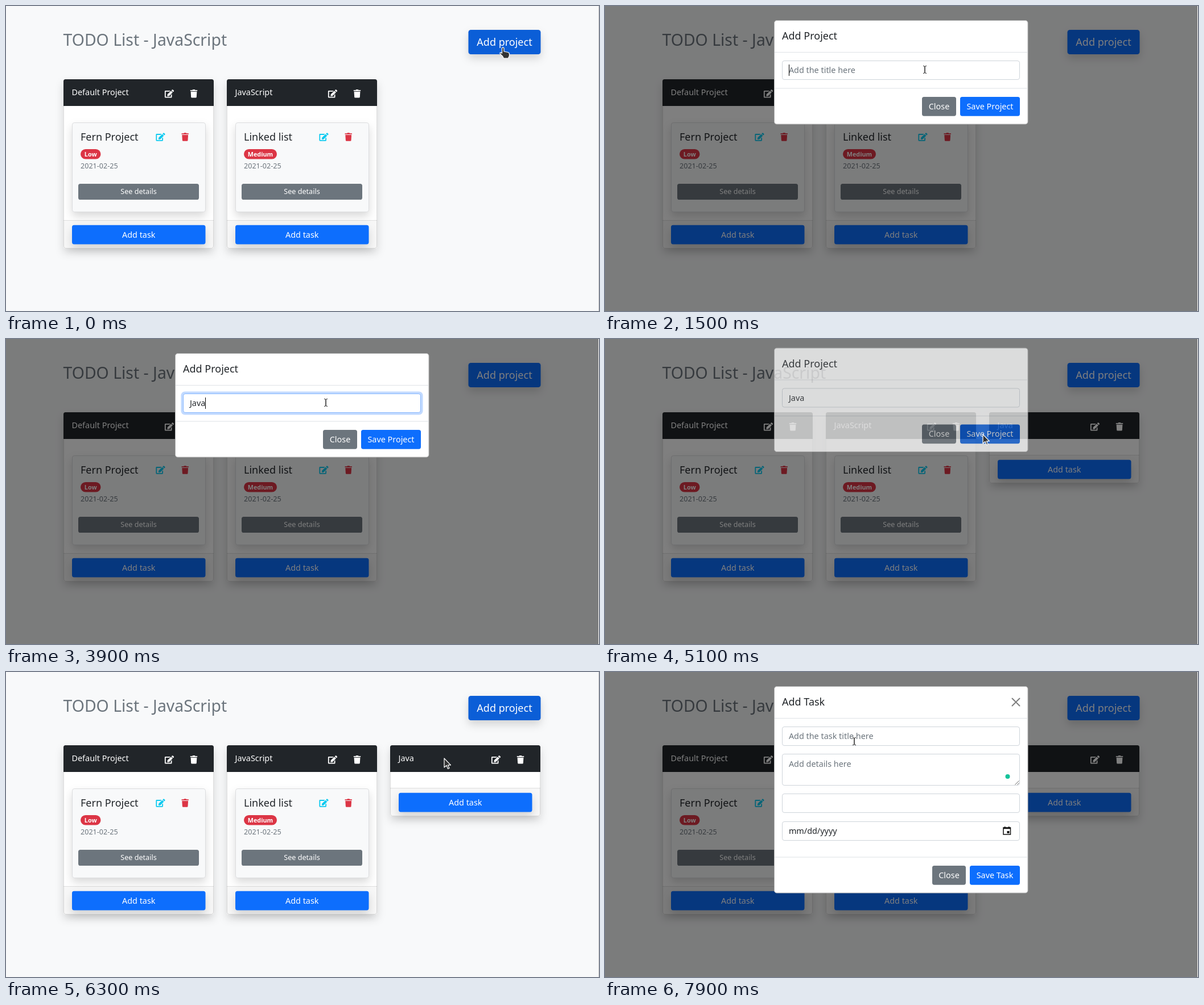
Recreate the animation shown at these times as an HTML page. Size 1042 by 537 pixels, loop 8000 ms.

```html
<!DOCTYPE html>
<html lang="en">
<head>
<meta charset="utf-8">
<title>Todo list</title>
<style>
  html, body { margin: 0; width: 100%; height: 100%; overflow: hidden; background: #f8f9fa; }
  svg { display: block; width: 1042px; height: 537px; }
  text { font-family: 'Noto Sans', 'Open Sans', sans-serif; font-size: 14.4px; white-space: pre; }
</style>
</head>
<body>
<svg id="stage" viewBox="0 0 1042 537"></svg>
<script>
const LOOP = 8000, STEP = 100;
const INK = '#212529', GRAY = '#6c757d', BLUE = '#0d6efd', RED = '#dc3545';
const EDIT = 'M403 83l90 90a10 10 0 0 1 0 14L274 406l-93 10a20 20 0 0 1-21-21l10-93L389 83a10 10 0 0 1 14 0z' +
  'M565 60a39 39 0 0 1 0 55l-35 36a10 10 0 0 1-14 0L425 61a10 10 0 0 1 0-14l36-35a39 39 0 0 1 55 0z' +
  'M384 346V448H64V128H294q5 0 8-3l40-40q10-16-8-21H48a48 48 0 0 0-48 48v352a48 48 0 0 0 48 48h352a48 48 0 0 0 48-48V306q-5-18-21-8l-40 40q-3 3-3 8z';
const TRASH = 'M432 32H312L303 13A24 24 0 0 0 281 0H167A24 24 0 0 0 145 13L136 32H16A16 16 0 0 0 0 48V80A16 16 0 0 0 16 96H432A16 16 0 0 0 448 80V48A16 16 0 0 0 432 32z' +
  'M53 467a48 48 0 0 0 48 45H347a48 48 0 0 0 48-45L416 128H32z';

// Markup helpers
const rect = (x, y, w, h, fill, r = 0, more = '') =>
  `<rect x="${x}" y="${y}" width="${w}" height="${h}" rx="${r}" fill="${fill}" ${more}/>`;
const box = (x, y, w, h, fill, line, r = 3.6, more = '') =>
  rect(x + .5, y + .5, w - 1, h - 1, fill, r, `stroke="${line}" ${more}`);
const text = (x, y, str, fill, size = 14.4, weight = 400, more = '') =>
  `<text x="${x}" y="${y}" fill="${fill}" style="font-size:${size}px;font-weight:${weight}" ${more}>${str}</text>`;
const icon = (path, cx, cy, width, fill) =>
  `<path d="${path}" fill="${fill}" transform="translate(${cx - width / 2} ${cy - 7.2}) scale(${14.4 / 512})"/>`;
const edit = (cx, cy, fill) => icon(EDIT, cx, cy, 16.2, fill);
const trash = (cx, cy, fill) => icon(TRASH, cx, cy, 12.6, fill);
const SHADOW = 'filter="url(#shadow)"';

function button(x, y, w, h, label, fill, { size = 14.4, id = '', shadow = false } = {}) {
  return rect(x, y, w, h, fill, size > 15 ? 4.3 : 3.6, `${id && `id="${id}"`} ${shadow ? SHADOW : ''}`) +
    text(x + w / 2, y + h / 2 + size * .357, label, '#fff', size, 400, 'text-anchor="middle"');
}

function taskCard(x, { title, level, badge }) {
  return box(x + 15, 205, 235, 158, '#f8f9fa', '#dcdddf', 3.6, SHADOW) +
    text(x + 30, 237, title, INK, 18, 500) +
    edit(x + 170.5, 230.5, '#0dcaf0') + trash(x + 213.7, 230.5, RED) +
    rect(x + 30, 252, badge, 17.5, RED, 8.75) +
    text(x + 30 + badge / 2, 264.6, level, '#fff', 10.8, 700, 'text-anchor="middle"') +
    text(x + 30, 286, '2021-02-25', GRAY, 12.6) +
    button(x + 26, 313, 212, 28, 'See details', GRAY, { size: 12.6 });
}

function column(x, title, task, id) {
  const foot = task ? 378 : 205;
  return rect(x, 129, 264, foot - 80, '#fff', 3.6, SHADOW) +
    rect(x, foot - 1, 264, 50, '#f7f7f7', 3.6) +
    rect(x, 176, 264, foot - 176, '#fff') +
    rect(x, foot - 1, 264, 1, '#dfdfdf') +
    box(x, 129, 264, foot - 80, 'none', '#000', 3.6, 'stroke-opacity=".125"') +
    `<path d="M${x} 176V132.6q0-3.6 3.6-3.6h256.8q3.6 0 3.6 3.6V176z" fill="${INK}"/>` +
    text(x + 14.5, 157, title, '#fff', 14.4, 500) +
    edit(x + 186, 154.3, '#fff') + trash(x + 229, 154.3, '#fff') +
    (task ? taskCard(x, task) : '') +
    button(x + 15, foot + 7.7, 234.5, 33.7, 'Add task', BLUE, { id, shadow: true });
}

const field = (y, h, id = '') => box(311, y, 418, h, '#fff', '#ced4da', 3.6, id && `id="${id}"`);

function dialog(id, title, bottom, body) {
  return `<g id="${id}">` + box(297, 25, 446.5, bottom - 25, '#fff', '#b5b5b5', 4.3) +
    text(311, 59, title, INK, 18, 500) +
    rect(298, 81, 444.5, 1, '#dee2e6') + rect(298, bottom - 64, 444.5, 1, '#dee2e6') + body + '</g>';
}

const projectBody =
  rect(307.4, 92.4, 425.2, 41.2, BLUE, 7, 'id="ring"') + field(96, 34, 'titleField') +
  text(322.9, 118, 'Add the title here', GRAY, 14.4, 400, 'id="hint"') +
  text(322.9, 118, '', INK, 14.4, 400, 'id="typed"') +
  rect(323, 103, 1, 20, '#000', 0, 'id="caret"') +
  button(557, 160, 60, 33.7, 'Close', GRAY) +
  button(624, 160, 105, 33.7, 'Save Project', BLUE, { id: 'save' });

const taskBody =
  '<path d="M715.5 46.5l13 13m0-13l-13 13" stroke="#7f7f7f" stroke-width="2" stroke-linecap="round"/>' +
  field(96, 34) + text(322.9, 118, 'Add the task title here', GRAY) +
  field(144, 56) + text(322.9, 166.5, 'Add details here', GRAY) +
  '<path d="M720.5 198.5l7-7m-3 7l3-3" stroke="#666"/>' +
  '<circle id="dot" cx="707.5" cy="184" r="4" fill="#15c39a"/>' +
  field(214, 34) + field(263, 34) + text(322.9, 285, 'mm/dd/yyyy', INK) +
  '<path d="M700 274h12.5v12H700zM700 275.5h12.5M702.7 272v2m7-2v2" fill="none" stroke="#111" stroke-width="1.5"/>' +
  rect(706.5, 280, 4, 4, '#111') +
  button(575, 341, 59, 33.7, 'Close', GRAY) +
  button(641, 341, 88, 33.7, 'Save Task', BLUE);

const stage = document.getElementById('stage');
stage.innerHTML =
  `<defs><filter id="shadow" filterUnits="userSpaceOnUse" x="0" y="0" width="1042" height="537" color-interpolation-filters="sRGB">
    <feDropShadow dx="0" dy="7.2" stdDeviation="7.2" flood-color="#000" flood-opacity=".15"/></filter></defs>` +
  rect(0, 0, 1042, 537, '#f8f9fa') +
  text(100.5, 69.7, 'TODO List - JavaScript', GRAY, 28.4, 500) +
  button(812.5, 42, 127, 43, 'Add project', BLUE, { size: 18, id: 'addProject', shadow: true }) +
  column(101, 'Default Project', { title: 'Fern Project', level: 'Low', badge: 35.5 }) +
  column(388, 'JavaScript', { title: 'Linked list', level: 'Medium', badge: 58 }) +
  `<g id="newColumn">${column(675, 'Java', null, 'addTask')}</g>` +
  rect(0, 0, 1041, 537, '#000', 0, 'id="backdrop"') +
  rect(1041, 0, 1, 537, '#ccc', 0, 'id="edge"') +
  dialog('projectDialog', 'Add Project', 208.5, projectBody) +
  dialog('taskDialog', 'Add Task', 389.5, taskBody) +
  `<g id="pointer" stroke-linejoin="round">
    <path id="arrow" d="M0 0V16L4 12.5 6.5 18.5 9 17.5 6.5 11.8H11.5Z" fill="#333" stroke="#fff" stroke-width="1.2"/>
    <path id="hand" d="M-1.5 1.5C-1.5-.8 2-.8 2 1.5V7l7 1.5q2.5.6 2.5 3V14q0 2-1.5 3.5V19H1.5Q0 15-4.5 11.5-6 9-3.5 8.8L-1.5 10.2Z" fill="#333" stroke="#fff" stroke-width="1.2"/>
    <path id="beam" d="M-3-6.5q3 0 3 1.5V5q0 1.5-3 1.5M3-6.5q-3 0-3 1.5V5q0 1.5 3 1.5" fill="none" stroke="#222"/>
  </g>`;

const el = {};
stage.querySelectorAll('[id]').forEach(node => el[node.id] = node);

// Timing helpers
const ramp = (t, start, length = 150) => Math.min(1, Math.max(0, (t - start) / length));
const pulse = (t, on, off, length) => ramp(t, on, length) - ramp(t, off);
const mix = (a, b, p) => `rgb(${a.map((v, i) => Math.round(v + (b[i] - v) * p))})`;
const blue = p => mix([13, 110, 253], [11, 94, 215], p);
const show = (node, on) => node.setAttribute('display', on ? 'inline' : 'none');
const lastBefore = (list, t) => list.filter(([at]) => at <= t).pop();

// cubic-bezier(0, 0, .58, 1)
function easeOut(u) {
  let low = 0, high = 1;
  for (let i = 0; i < 20; i++) {
    const s = (low + high) / 2;
    if (1.74 * (1 - s) * s * s + s ** 3 < u) low = s; else high = s;
  }
  return 3 * (1 - low) * low * low + low ** 3;
}

const PATH = [
  [0, 873, 73], [750, 873, 73], [1300, 590, 112], [1500, 562, 112], [4500, 562, 112],
  [4900, 664, 168], [5600, 664, 168], [6300, 770, 152], [6600, 824, 234],
  [7200, 824, 234], [7600, 460, 113], [7700, 460, 113], [7900, 438, 122], [8000, 438, 122]
];
const SHAPES = [
  [0, 'hand'], [600, 'arrow'], [1300, 'beam'], [4700, 'arrow'], [4900, 'hand'],
  [5100, 'arrow'], [6500, 'hand'], [7100, 'arrow'], [7600, 'beam']
];
const TYPING = [[0, ''], [2800, 'J'], [3500, 'Ja'], [3700, 'Jav'], [3900, 'Java']];

function placePointer(t) {
  const i = Math.max(1, PATH.findIndex(([at]) => at > t));
  const [t0, x0, y0] = PATH[i - 1], [t1, x1, y1] = PATH[i];
  const u = ramp(t, t0, t1 - t0), p = u * u * (3 - 2 * u);
  el.pointer.setAttribute('transform', `translate(${x0 + (x1 - x0) * p} ${y0 + (y1 - y0) * p})`);
  const shape = lastBefore(SHAPES, t)[1];
  for (const name of ['arrow', 'hand', 'beam']) show(el[name], name === shape);
}

function placeDialog(node, t, open, close) {
  const opacity = pulse(t, open, close);
  const slide = easeOut(ramp(t, open, 300)) - easeOut(ramp(t, close, 300));
  show(node, opacity > 0);
  node.setAttribute('opacity', opacity);
  node.setAttribute('transform', `translate(0 ${45 * (slide - 1)})`);
}

function draw(time) {
  const t = Math.floor(time % LOOP / STEP) * STEP;

  const dim = .5 * (pulse(t, 568, 5367) + ramp(t, 7100, 60));
  el.backdrop.setAttribute('opacity', dim);
  el.edge.setAttribute('fill', dim > 0 ? '#fff' : '#ccc');
  show(el.newColumn, t >= 5100);

  el.addProject.setAttribute('fill', blue(1 - ramp(t, 680) + ramp(t, 5520) - ramp(t, 6900, 100)));
  el.addTask.setAttribute('fill', blue(pulse(t, 6450, 7200)));
  el.save.setAttribute('fill', blue(pulse(t, 4820, 5060)));

  placeDialog(el.projectDialog, t, 730, 5060);
  placeDialog(el.taskDialog, t, 7168, LOOP);
  show(el.dot, t >= 7500);

  const focus = pulse(t, 1500, 4900);
  el.ring.setAttribute('opacity', .25 * focus);
  el.titleField.setAttribute('stroke', mix([206, 212, 218], [134, 183, 254], focus));
  const typed = lastBefore(TYPING, t)[1];
  el.typed.textContent = typed;
  show(el.hint, !typed);
  show(el.caret, t >= 1500 && t < 2100 || t >= 2800 && t < 5000);
  el.caret.setAttribute('x', Math.round(322.9 + (typed ? el.typed.getComputedTextLength() : 0)));

  placePointer(t);
}

const begin = performance.now();
(function tick() {
  draw(performance.now() - begin);
  requestAnimationFrame(tick);
})();
</script>
</body>
</html>
```
